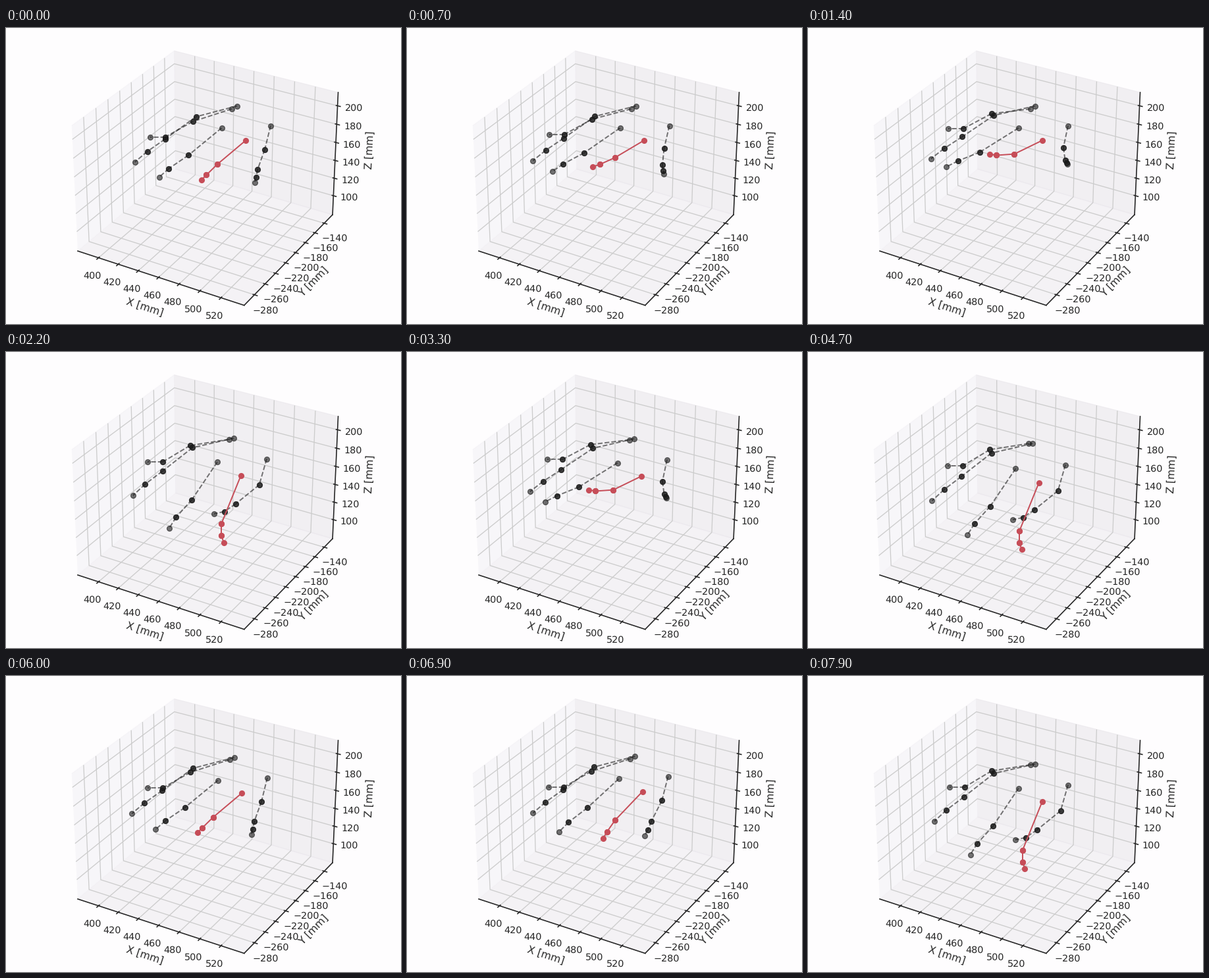
A matplotlib script for the animation above (8 s loop, 600 by 450 pixels).

```python
import numpy as np
import matplotlib.pyplot as plt
from matplotlib.animation import FuncAnimation

W, H = 600, 450
FRAMES, STEP = 80, 100
INK = "0.15"
RED = "#c64d58"

plt.rcParams.update({
    "font.family": "DejaVu Sans", "text.hinting": "none",
    "axes.edgecolor": INK, "axes.labelcolor": INK, "text.color": INK,
    "xtick.color": INK, "ytick.color": INK,
    "axes.linewidth": 1.25, "xtick.major.width": 1.25, "ytick.major.width": 1.25,
    "grid.color": "0.8", "grid.linewidth": 1.0,
    "axes.labelsize": 12, "xtick.labelsize": 11, "ytick.labelsize": 11,
    "lines.linewidth": 1.5, "lines.markersize": 6,
})

fig = plt.figure(figsize=(6.4, 4.8), dpi=93.75, facecolor="#fefdfe")

ax = fig.add_axes([0, 0, 1, 1], projection="3d", facecolor="none")
ax.view_init(elev=30, azim=-60)
ax.set_xticks(range(400, 521, 20))
ax.set_yticks(range(-280, -139, 20))
ax.set_zticks(range(100, 201, 20))
ax.set(xlim=(378.7, 541.7), ylim=(-299, -121.9), zlim=(78.1, 214.3),
       xlabel="X [mm]", ylabel="Y [mm]", zlabel="Z [mm]")
for axis, v in ((ax.xaxis, 0.95), (ax.yaxis, 0.90), (ax.zaxis, 0.925)):
    axis.set_pane_color((v, v - 0.01, v + 0.01, 0.5))

# Flat layer in screen pixels for the hand
layer = fig.add_axes([0, 0, 1, 1])
layer.set(xlim=(0, W), ylim=(H, 0))
layer.axis("off")

# Hand motion: seconds, curl (0 open, 1 fist), palm shift x and y
MOTION = np.array([
    (0.0, 0.47, 0, 0),
    (1.4, 0.00, -7, 0),
    (2.2, 1.00, -6, 14),
    (3.3, 0.00, -7, 15),
    (4.7, 1.00, -11, 23),
    (5.4, 0.50, -5, 1),
    (6.0, 0.47, -5, 6),
    (6.5, 0.50, -5, 1),
    (7.9, 1.00, -7, 17),
])


def motion(t):
    """Curl and palm shift, eased between key moments."""
    times = MOTION[:, 0]
    i = min(np.searchsorted(times, t, side="right"), len(times) - 1)
    u = (t - times[i - 1]) / (times[i] - times[i - 1])
    u = (1 - np.cos(np.pi * u)) / 2
    _, curl, dx, dy = (1 - u) * MOTION[i - 1] + u * MOTION[i]
    return curl, np.array([dx, dy])


class Finger:
    """Chain of bones; angles in degrees below the leftward direction."""

    def __init__(self, base, follow, sag, length, open_, fist, grow=0, **style):
        self.base, self.follow, self.sag = np.array(base), follow, sag
        self.length, self.grow = np.array(length), np.array(grow)
        self.open, self.fist = np.radians(open_), np.radians(fist)
        style = {"color": "0.1", "alpha": 0.6, "ls": "--", **style}
        self.lines = [layer.plot([], [], marker="o", **style)[0] for _ in length]

    def joints(self, curl, shift):
        angle = self.open + curl * (self.fist - self.open)
        reach = self.length + curl * self.grow
        bones = np.column_stack([-reach * np.cos(angle), reach * np.sin(angle)])
        bones[0, 1] += self.sag * 4 * curl * (1 - curl)
        start = self.base + self.follow * shift
        return np.vstack([start, start + bones.cumsum(axis=0)])

    def draw(self, curl, shift):
        pts = self.joints(curl, shift)
        for line, a, b in zip(self.lines, pts, pts[1:]):
            line.set_data(*zip(a, b))


little = Finger((343, 123), 0.7, 11, [60, 48, 23], [7, 28, 0], [9, 31, 0])
ring = Finger((351, 118.5), 0.9, 2, [64, 58, 33, 25],
              [13, 34, 33, 38], [13, 38, 37, 43])
middle = Finger((327.5, 152), 1.1, -6, [69, 36, 20], [32, 22, 27], [56, 48, 58])
thumb = Finger((402, 148.5), 1.0, 0, [34, 19, 5, 2],
               [78, 98, 118, 130], [74, 39, 34, 12], grow=[7, 27, 16, 14])
index = Finger((364, 171), 1.2, -8, [47, 27, 11], [26, 4, -10], [68, 90, 108],
               grow=[32, -9, 0], color=RED, alpha=1, ls="-")
hand = [little, ring, middle, thumb, index]


def update(frame):
    pose = motion(frame * STEP / 1000)
    for finger in hand:
        finger.draw(*pose)
    return [line for finger in hand for line in finger.lines]


anim = FuncAnimation(fig, update, frames=FRAMES, interval=STEP,
                     repeat=True, repeat_delay=0)
plt.show()
```
